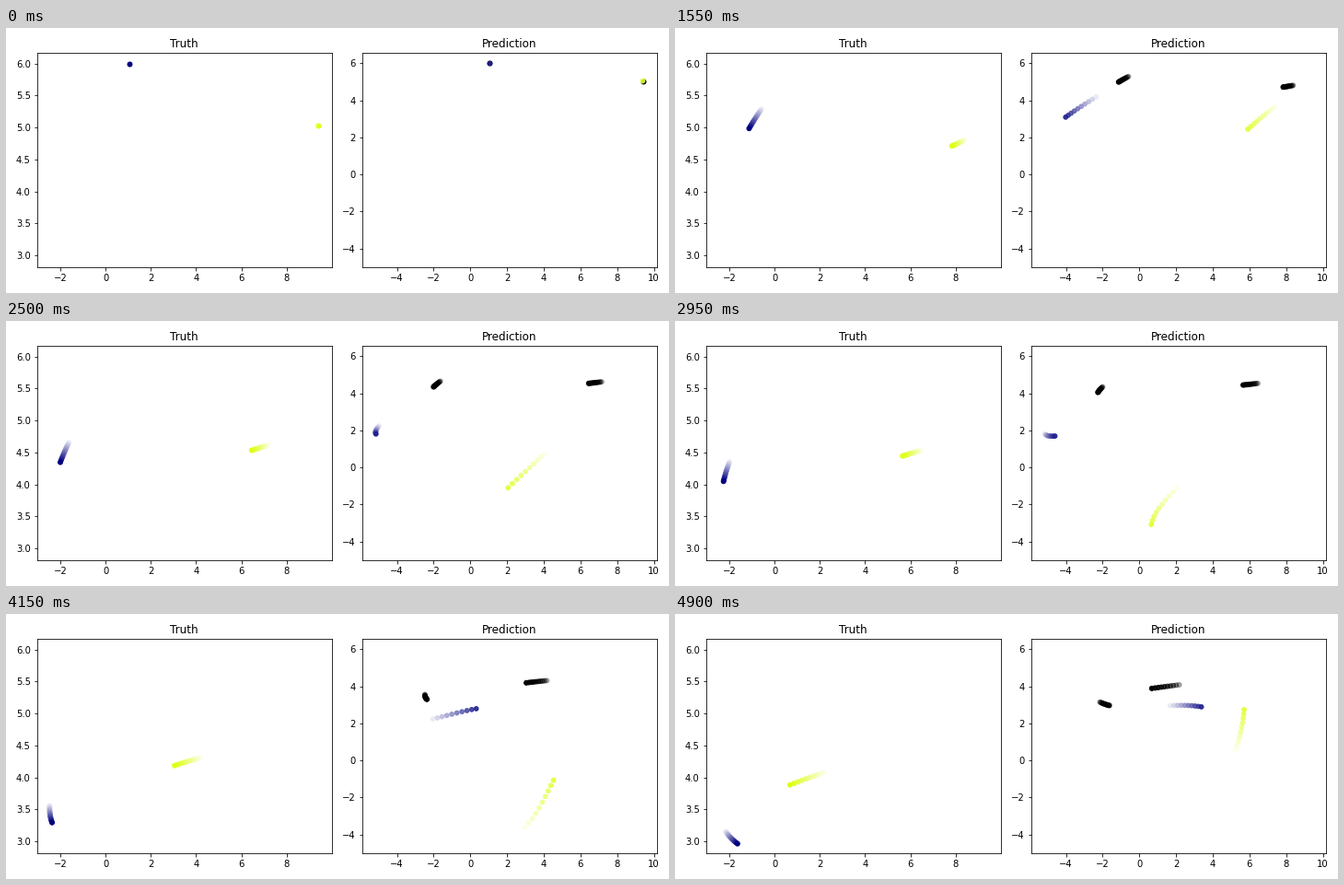
A matplotlib script for the animation above (4950 ms loop, 720 by 288 pixels).

```python
import numpy as np
import matplotlib.pyplot as plt
from matplotlib.animation import FuncAnimation

FRAMES, INTERVAL, TRAIL = 99, 50, 10
NAVY, LIME, BLACK = np.array([[0, 0, 0.5], [0.875, 1, 0.09], [0, 0, 0]])


def curve(*keys):
    """Smooth path through a few (step, x, y) keys, one point per frame."""
    keys = np.array(keys, float)
    t, p = keys[:, 0], keys[:, 1:]
    slope = np.gradient(p, t, axis=0, edge_order=2)
    steps = np.arange(FRAMES)
    i = np.clip(np.searchsorted(t, steps, side="right") - 1, 0, len(t) - 2)
    h = (t[i + 1] - t[i])[:, None]
    u = (steps - t[i])[:, None] / h
    return ((1 + 2 * u) * (1 - u) ** 2 * p[i] + u * (1 - u) ** 2 * h * slope[i]
            + u * u * (3 - 2 * u) * p[i + 1] + u * u * (u - 1) * h * slope[i + 1])


true_navy = curve((0, 1.06, 6.0), (31, -1.13, 4.985), (59, -2.26, 4.05),
                  (83, -2.37, 3.295), (98, -1.645, 2.965))
true_lime = curve((0, 9.4, 5.036), (31, 7.84, 4.712), (59, 5.66, 4.446),
                  (83, 3.05, 4.187), (98, 0.68, 3.885))
guess_navy = curve((0, 1.03, 6.02), (16, -1.19, 4.88), (31, -4.02, 3.09),
                   (42, -5.04, 2.17), (59, -4.6, 1.69), (74, -2.04, 2.24),
                   (83, 0.32, 2.79), (98, 3.38, 2.89))
guess_lime = curve((0, 9.38, 5.06), (16, 8.17, 4.28), (31, 5.91, 2.44),
                   (42, 3.86, 0.58), (59, 0.65, -3.08), (64, 0.68, -4.1),
                   (69, 1.68, -4.47), (74, 2.95, -3.62), (83, 4.53, -1.07),
                   (98, 5.71, 2.74))

fig, (left, right) = plt.subplots(1, 2, figsize=(10, 4), dpi=72)
left.set(title="Truth", xlim=(-3.03, 9.99), ylim=(2.813, 6.17))
right.set(title="Prediction", xlim=(-5.906, 10.15), ylim=(-5.02, 6.57))
fig.tight_layout()
fig.subplots_adjust(right=706.5 / 720, wspace=33 / 319.5)


class Trail:
    """The latest dots of a path, fading out in colour or in opacity."""

    def __init__(self, ax, path, color, size=25, strength=1, alpha=1):
        self.dots = ax.scatter([], [], s=size)
        self.path, self.color = path, color
        self.strength, self.alpha = strength, alpha

    def show(self, frame):
        points = self.path[max(0, frame - TRAIL + 1):frame + 1]
        ramp = np.arange(1, len(points) + 1)[:, None] / len(points)
        if self.color is BLACK:
            rgb, alpha = np.zeros((len(points), 3)), np.sqrt(ramp)
        else:
            rgb = 1 - ramp * self.strength * (1 - self.color)
            alpha = np.full_like(ramp, self.alpha)
        self.dots.set_offsets(points)
        self.dots.set_facecolor(np.hstack([rgb, alpha]))
        return self.dots


soft = dict(size=22, strength=0.88, alpha=0.9)
trails = [
    Trail(left, true_navy, NAVY),
    Trail(left, true_lime, LIME),
    Trail(right, true_navy, BLACK),
    Trail(right, true_lime, BLACK),
    Trail(right, guess_navy, NAVY, **soft),
    Trail(right, guess_lime, LIME, **soft),
]


def update(frame):
    return [trail.show(frame) for trail in trails]


anim = FuncAnimation(fig, update, frames=FRAMES, interval=INTERVAL,
                     repeat=True, repeat_delay=0)
plt.show()
```
